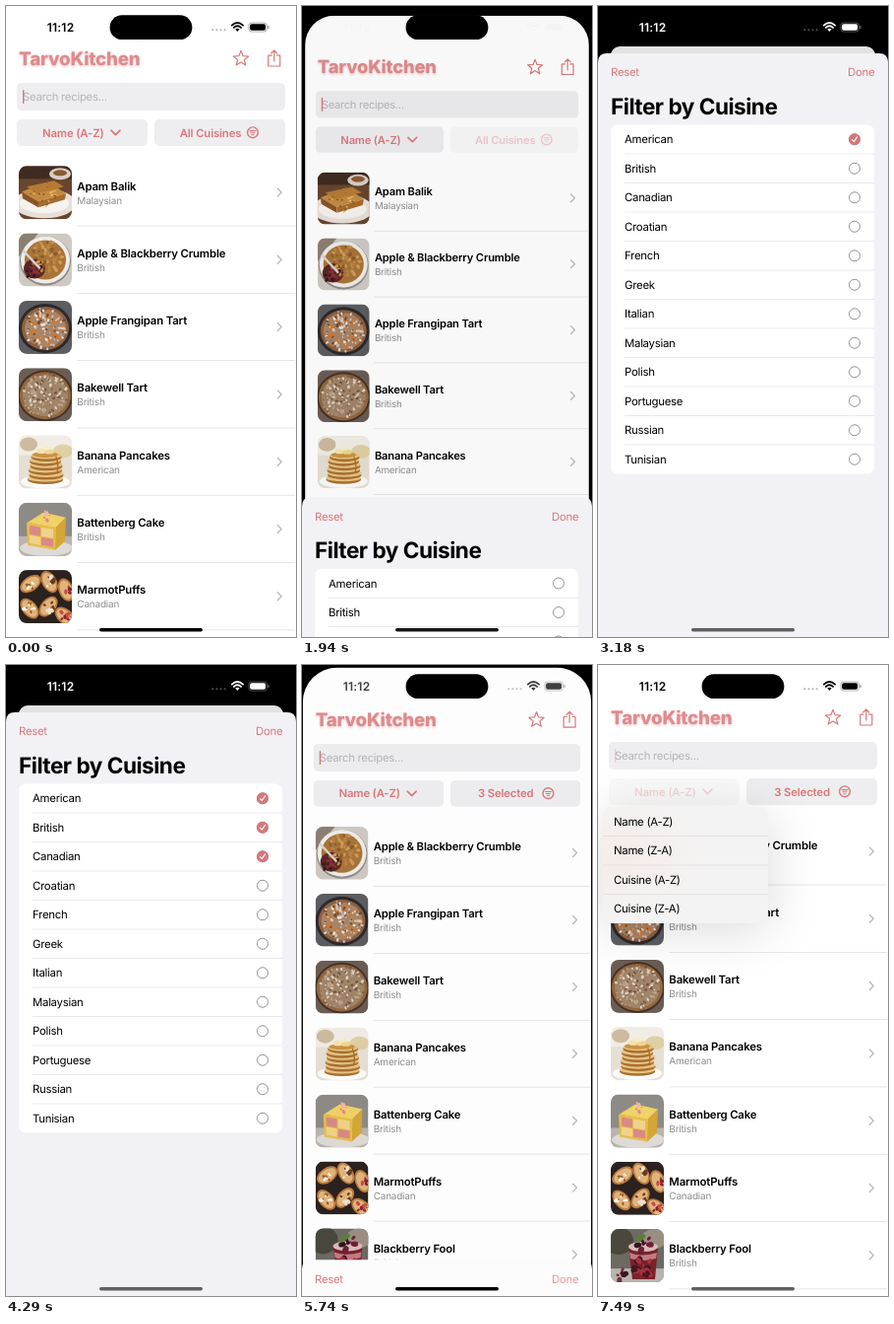
An HTML page for the animation above (8 s loop, 295 by 640 pixels).

```html
<!DOCTYPE html>
<html lang="en">
<head>
<meta charset="utf-8">
<title>Recipe list</title>
<style>
  html, body { margin: 0; width: 100%; height: 100%; overflow: hidden; background: #fff; }
  svg { display: block; width: 100%; height: 100%; }
  text { font-family: Inter, "Noto Sans", sans-serif; font-size: 11.4px; letter-spacing: -.28px; font-optical-sizing: none; white-space: pre; text-rendering: geometricPrecision; }
  .semi { font-weight: 600; letter-spacing: -.17px; }
  .clock { font-size: 12px; font-weight: 600; letter-spacing: .2px; }
  .sub { font-size: 10px; letter-spacing: -.2px; fill: #8e8e93; }
  .brand { font-size: 18.8px; font-weight: 800; letter-spacing: -.2px; }
  .large { font-size: 22.6px; font-weight: 700; letter-spacing: -.5px; }
  .line { fill: none; stroke-linecap: round; stroke-linejoin: round; }
</style>
</head>
<body>
<svg id="stage" viewBox="0 0 295 640" xmlns="http://www.w3.org/2000/svg"></svg>
<script>
const LOOP = 8000, W = 295, H = 640, PINK = '#db7779';
const PITCH = 68.3, SHEET_TOP = 48, CELL = 29.5;
const cuisines = ['American', 'British', 'Canadian', 'Croatian', 'French', 'Greek',
  'Italian', 'Malaysian', 'Polish', 'Portuguese', 'Russian', 'Tunisian'];
const sorts = ['Name (A-Z)', 'Name (Z-A)', 'Cuisine (A-Z)', 'Cuisine (Z-A)'];
const tickTimes = [3180, 3650, 4290];

// Markup helpers
const text = (x, y, s, cls = '', fill = '#000') =>
  `<text x="${x}" y="${y}" class="${cls}" fill="${fill}">${s.replace('&', '&amp;')}</text>`;
const rect = (x, y, w, h, fill, r = 0, more = '') =>
  `<rect x="${x}" y="${y}" width="${w}" height="${h}" rx="${r}" fill="${fill}" ${more}/>`;
const oval = (x, y, rx, ry, fill, turn = 0) =>
  `<ellipse cx="${x}" cy="${y}" rx="${rx}" ry="${ry}" fill="${fill}" transform="rotate(${turn} ${x} ${y})"/>`;
const shape = (d, fill) => `<path d="${d}" fill="${fill}"/>`;
const line = (d, color, w) => `<path d="${d}" class="line" stroke="${color}" stroke-width="${w}"/>`;
const repeat = (n, f) => Array.from({ length: n }, (_, i) => f(i)).join('');

function specks(n, x, y, r, colors, size, seed) {
  const rnd = () => (seed = seed * 16807 % 2147483647) / 2147483647;
  return repeat(n, i => {
    const a = rnd() * 6.283, d = Math.sqrt(rnd()) * r, s = size * (.5 + rnd());
    return oval((x + Math.cos(a) * d).toFixed(1), (y + Math.sin(a) * d).toFixed(1),
      s.toFixed(1), (s * .7).toFixed(1), colors[i % colors.length], Math.round(a * 57));
  });
}

// Simple food pictures on a 54 x 54 tile
const art = {
  apam: () => rect(0, 0, 54, 54, '#68452e') + rect(0, 0, 54, 13, '#3f2b21') +
    oval(42, 8, 11, 6, '#d8cfc4') + oval(42, 7, 7, 3, '#8a5a35') +
    oval(26, 38, 32, 15, '#e6dfda') + oval(26, 38, 25, 10, '#f6f2ee') +
    shape('M3 26L30 16L48 28L20 36Z', '#c48a42') + shape('M3 26L20 36L20 42L4 33Z', '#8b5424') +
    shape('M20 36L48 28L47 34L20 42Z', '#a66c2c') + shape('M8 21L36 15L46 21L18 28Z', '#b67a35') +
    specks(22, 25, 29, 14, ['#e3b566', '#8a5727'], 1.1, 11),
  crumble: () => rect(0, 0, 54, 54, '#cfc9c4') + shape('M0 0H20L0 24Z', '#8d7e72') +
    oval(27, 28, 26, 25, '#8f8a86') + oval(27, 27, 25, 24, '#efece8') + oval(27, 27, 21, 20, '#a87438') +
    oval(16, 36, 11, 10, '#5a2625') + specks(60, 30, 24, 17, ['#cf9c56', '#8f5a2a', '#bd8642'], 1.8, 5) +
    specks(14, 15, 38, 8, ['#8a2f35', '#35191c'], 2, 8) + line('M5 18L21 35', '#d8d2cb', 2.4),
  frangipan: () => rect(0, 0, 54, 54, '#5c5d61') + oval(27, 28, 27, 25, '#2a292c') +
    oval(27, 28, 24, 22, '#8f6040') + oval(27, 28, 21, 19, '#a98567') +
    repeat(9, i => { const a = i * .7;
      return oval((27 + Math.cos(a) * 14).toFixed(1), (28 + Math.sin(a) * 13).toFixed(1), 4.5, 2, '#c97a35', i * 40); }) +
    specks(90, 27, 28, 21, ['#e9e2dc', '#6d4a33', '#cfc4bb'], 1.3, 21),
  bakewell: () => rect(0, 0, 54, 54, '#6b5d53') + oval(27, 28, 28, 26, '#43332a') +
    oval(27, 28, 26, 24, '#94683f') + oval(27, 28, 23, 21, '#a08468') +
    specks(130, 27, 28, 23, ['#ddd2c6', '#76563e', '#bfa78f'], 1.3, 33),
  pancakes: () => rect(0, 0, 54, 54, '#e6dfd3') + rect(0, 0, 54, 20, '#f1ede6') + oval(10, 9, 9, 7, '#cdbb9e') +
    oval(45, 16, 10, 7, '#dfd0a4') + oval(27, 47, 25, 7, '#fbfaf8') +
    repeat(6, i => oval(27 + (i % 2), 45 - i * 4.6, 18 - i * .5, 4.6, '#a97030') +
      oval(27 + (i % 2), 43.4 - i * 4.6, 18 - i * .5, 3.7, '#e6c383')) +
    oval(27, 19.5, 13, 3, '#cb9243') + oval(23, 16, 5, 2.6, '#f4e3ae') + oval(31, 16.5, 5, 2.6, '#eed591') +
    oval(28, 13, 4, 2.2, '#f8ecc4') + line('M38 22Q41 31 39 38', '#b06f25', 1.4),
  battenberg: () => rect(0, 0, 54, 54, '#8e8a85') + rect(0, 34, 54, 20, '#b9b4ae') + oval(28, 46, 27, 8, '#dedad6') +
    shape('M9 20L25 10L48 15L37 26Z', '#f1d266') + shape('M37 26L48 15L47 39L37 48Z', '#d5a536') +
    shape('M8 20L38 25L37 48L9 43Z', '#e5bd4b') +
    shape('M11 23L22 25L22 34L11 32Z', '#d98986') + shape('M23 25L35 27L35 36L23 34Z', '#efd389') +
    shape('M11 33L22 35L22 43L11 41Z', '#efd389') + shape('M23 35L35 37L35 45L23 43Z', '#d98986') +
    specks(6, 27, 13, 6, ['#dd8d8d', '#f3b3ac'], 2, 4),
  pastry: () => rect(0, 0, 54, 54, '#2b211e') +
    [[12, 14, -35], [31, 12, 60], [48, 20, 70], [11, 39, 50], [30, 37, -50], [47, 47, 40]].map(([x, y, a], i) =>
      oval(x, y, 12, 7.5, '#b97a3f', a) + oval(x, y, 10, 5.8, '#e0b47b', a) +
      specks(8, x, y, 5.5, [['#fff3e2', '#9b5b2b'], ['#6a3a22', '#f1e2ce'], ['#8e1f2c', '#c74a4d']][i % 3], 1.9, i + 40)).join(''),
  fool: () => rect(0, 0, 54, 54, '#6d6963') + rect(0, 40, 54, 14, '#b9b3ae') + oval(8, 12, 15, 14, '#49483b') +
    oval(44, 10, 13, 10, '#9b8f83') + shape('M18 18H48L45 51H22Z', '#7a222c') + oval(33, 18, 15, 5, '#d9b9ba') +
    shape('M19 24Q31 29 47 24L46 30Q31 34 20 30Z', '#c07c82') + specks(22, 33, 39, 10, ['#481620', '#a8323f'], 2.5, 9) +
    specks(8, 33, 15, 8, ['#32151f', '#6d2134'], 3, 15) + oval(30, 9, 6, 3, '#5d7d3c', -30) +
    specks(6, 9, 47, 7, ['#3b1722', '#74303c'], 2.6, 18)
};
const recipes = [
  ['Apam Balik', 'Malaysian', 'apam'], ['Apple & Blackberry Crumble', 'British', 'crumble'],
  ['Apple Frangipan Tart', 'British', 'frangipan'], ['Bakewell Tart', 'British', 'bakewell'],
  ['Banana Pancakes', 'American', 'pancakes'], ['Battenberg Cake', 'British', 'battenberg'],
  ['MarmotPuffs', 'Canadian', 'pastry'], ['Blackberry Fool', 'British', 'fool']
];

const recipeRow = ([name, cuisine, pic], i) => `<g transform="translate(0 ${(i * PITCH).toFixed(1)})">
  <g transform="translate(13 162.3)" clip-path="url(#tile)">${art[pic]()}</g>
  ${text(72.3, 186.6, name, 'semi')}${text(72.3, 200.6, cuisine, 'sub')}
  ${line('M276.3 185L280.2 189L276.3 193', '#bcbcc0', 1.4)}${rect(72, 222.7, 222, .7, '#dcdcdf')}</g>`;

const filterIcon = `<circle cx="251" cy="128.3" r="5.4" fill="none" stroke="${PINK}" stroke-width="1.4"/>` +
  line('M248 126.6H254M248.9 128.7H253.1M250 130.7H252', PINK, 1.1);
const pill = (id, x, inner) => `<g id="${id}">${rect(x, 115, 133, 27, '#eeeef1', 5)}${inner}</g>`;

const header = `
  <g filter="url(#glow)">${text(13, 59.6, 'TarvoKitchen', 'brand', '#e08b8d')}</g>
  ${line('M239 45.4L241.1 50.7L246.7 51L242.4 54.6L243.8 60.1L239 57L234.2 60.1L235.6 54.6L231.3 51L236.9 50.7Z', PINK, 1.2)}
  ${line('M270 50.2H266.8V61H278.8V50.2H275.6M272.8 56V45.2M269.8 48L272.8 45L275.8 48', PINK, 1.2)}
  ${rect(11, 78, 273, 28, '#eeeef1', 5)}${text(17, 96.2, 'Search recipes...', '', '#b4b4b9')}
  ${rect(17, 85, 1.4, 14, PINK, .6, 'id="caret"')}
  ${pill('sort', 11, text(37, 132.5, 'Name (A-Z)', 'semi', PINK) + line('M107 126.2L111.5 130.7L116 126.2', PINK, 1.7))}
  ${pill('filter', 151, `<g id="all">${text(176.7, 132.5, 'All Cuisines', 'semi', PINK)}</g>
    <g id="some">${text(179.2, 132.5, '3 Selected', 'semi', PINK)}</g>${filterIcon}`)}`;

const cuisineRow = (name, i) => {
  const y = 72.5 + i * CELL, mid = y + CELL / 2;
  return text(27, mid + 4.1, name) + (i ? rect(27, y - .3, 254, .6, '#dcdce0') : '') +
    `<circle cx="261" cy="${mid}" r="5.5" fill="none" stroke="#88888d" stroke-width=".9"/>` +
    (i < 3 ? `<g id="tick${i}"><circle cx="261" cy="${mid}" r="6" fill="#d5787a"/>` +
      line(`M258.5 ${mid + .3}L260.3 ${mid + 2.3}L263.6 ${mid - 2.4}`, '#fff', 1.1) + '</g>' : '');
};

const menu = `<g id="menu">
  ${rect(5, 152, 168, 116, '#000', 8, 'opacity=".15" filter="url(#soft)"')}
  ${rect(5, 144, 168, 118, 'url(#glass)', 8)}
  ${repeat(3, i => rect(5, 173.2 + i * CELL, 168, .6, '#d9d7d7'))}
  ${repeat(4, i => text(16, 163 + i * CELL, sorts[i]))}</g>`;

const statusBar = `<g id="status" fill="currentColor" stroke="none">
  ${text(41.8, 26, '11:12', 'clock', 'currentColor')}
  ${repeat(4, i => `<circle cx="${210.3 + i * 4.1}" cy="24.3" r="1" opacity=".32"/>`)}
  ${line('M229.8 19.6Q235.4 14.6 241 19.6M231.8 21.9Q235.4 18.8 239 21.9', 'currentColor', 1.9)}
  ${shape('M233.2 23.6Q235.4 21.9 237.6 23.6L235.4 26Z', 'currentColor')}
  <rect x="246.8" y="17" width="18.6" height="9" rx="3" fill="none" stroke="currentColor" stroke-width=".8" opacity=".4"/>
  ${rect(248.1, 18.3, 16, 6.4, 'currentColor', 1.9)}${rect(266.4, 20, 1.2, 3, 'currentColor', .6, 'opacity=".45"')}</g>
  ${rect(105.6, 9.3, 83.8, 24.8, '#000', 12.4)}`;

document.getElementById('stage').innerHTML = `
  <defs>
    <clipPath id="tile">${rect(0, 0, 54, 54, '#000', 8)}</clipPath>
    <clipPath id="round">${rect(0, 0, W, H, '#000', 0, 'id="corner"')}</clipPath>
    <filter id="glow" x="-10%" y="-30%" width="120%" height="170%">
      <feDropShadow dx="0" dy="1.2" stdDeviation="1.3" flood-color="#dd8183" flood-opacity=".5"/></filter>
    <filter id="soft" x="-70%" y="-90%" width="240%" height="280%"><feGaussianBlur stdDeviation="27"/></filter>
    <radialGradient id="glass" cx=".12" cy=".42" r=".5">
      <stop offset="0" stop-color="#f5ece8"/><stop offset="1" stop-color="#f4f3f3"/></radialGradient>
  </defs>
  ${rect(0, 0, W, H, '#000')}
  <g id="card" clip-path="url(#round)">
    ${rect(0, 0, W, H, '#fff')}${header}
    <g id="full">${recipes.slice(0, 7).map(recipeRow).join('')}</g>
    <g id="picked">${recipes.slice(1).map(recipeRow).join('')}</g>
    ${menu}${rect(0, 0, W, H, '#000', 0, 'id="dim"')}
  </g>
  <g id="sheet"><path id="panel"/>
    ${text(13, 23.3, 'Reset', '', PINK)}<g id="done">${text(254, 23.3, 'Done', '', PINK)}</g>
    ${text(13, 62.2, 'Filter by Cuisine', 'large')}
    ${rect(13, 72.5, 268, CELL * 12, '#fff', 7)}${cuisines.map(cuisineRow).join('')}
  </g>
  ${statusBar}${rect(95, 631, 105, 3.4, '#000', 1.7, 'id="home"')}`;

const ui = {};
document.querySelectorAll('[id]').forEach(n => ui[n.id] = n);
const set = (id, attrs) => { for (const k in attrs) ui[id].setAttribute(k, attrs[k]); };
const show = (id, on) => set(id, { visibility: on ? 'visible' : 'hidden' });
const clamp = x => Math.min(1, Math.max(0, x));
const ramp = (t, a, b) => clamp((t - a) / (b - a));
const grey = (a, b, k) => { const v = Math.round(a + (b - a) * k); return `rgb(${v},${v},${v})`; };

// Critically damped spring, 0 to 1
function spring(ms) {
  const x = Math.max(0, ms) * .016;
  return 1 - (1 + x) * Math.exp(-x);
}

// Transitions advance in about nine steps per second: [start, end, steps]
const moves = [[1640, 2390, 8], [5520, 6180, 7], [6730, 7490, 8]];
function stepped(t) {
  for (const [a, b, n] of moves) {
    const d = (b - a) / (n - 1);
    if (t >= a && t < b) return a + Math.floor((t - a + 18) / d) * d;
  }
  return t;
}

function caretAlpha(t) {
  if (t > 1740 && t < 6420) return 1;
  const phase = (Math.min(t, 7490) - (t < 4000 ? 260 : 6420) + 1020) % 1020;
  return phase < 120 ? .3 : phase < 360 ? 0 : phase < 415 ? .7 : 1;
}

function draw(now) {
  const t = stepped(now), closing = t >= 5520;
  let p = closing ? 1 - spring(t - 5460) : spring(t - 1796);
  p = p < .001 ? 0 : p > .999 ? 1 : p;

  const s = 1 - .088 * p;
  set('card', { transform: `translate(${W / 2 * (1 - s)} ${41 * p}) scale(${s})` });
  set('corner', { rx: p ? 37 - 27 * p : 0 });
  set('dim', { opacity: .115 * p });

  const filtered = t >= tickTimes[0];
  show('full', !filtered); show('all', !filtered);
  show('picked', filtered); show('some', filtered);
  set('caret', { opacity: caretAlpha(now) });
  set('filter', { opacity: 1 - .8 * ramp(t, 1590, 1740) * (1 - ramp(t, 1780, 2100)) });

  const m = spring(t - 6745);
  set('sort', { opacity: 1 - .7 * m });
  show('menu', m > 0);
  set('menu', { opacity: m ** 1.5, transform: `translate(77.5 144) scale(${m}) translate(-77.5 -144)` });

  const r = p === 1 ? 0 : 44, top = 9, h = H - SHEET_TOP;
  show('sheet', p > 0);
  set('sheet', { transform: `translate(0 ${SHEET_TOP + h * (1 - p)})` });
  set('panel', {
    d: `M0 ${top}Q0 0 ${top} 0H${W - top}Q${W} 0 ${W} ${top}V${h - r}a${r} ${r} 0 0 1 ${-r} ${r}H${r}a${r} ${r} 0 0 1 ${-r} ${-r}Z`,
    fill: closing ? '#fcfcfd' : '#f2f2f6'
  });
  tickTimes.forEach((at, i) => ui['tick' + i].style.display = t >= at ? '' : 'none');
  set('done', { opacity: t < 5300 ? 1 : .3 + .7 * ramp(t, 5520, 5880) });

  set('status', { color: grey(0, 255, clamp(p * 4)) });
  set('home', { fill: grey(0, 96, t >= 6730 ? 1 : p) });
}

const start = performance.now();
function tick() {
  draw((performance.now() - start) % LOOP);
  requestAnimationFrame(tick);
}
tick();
</script>
</body>
</html>
```
